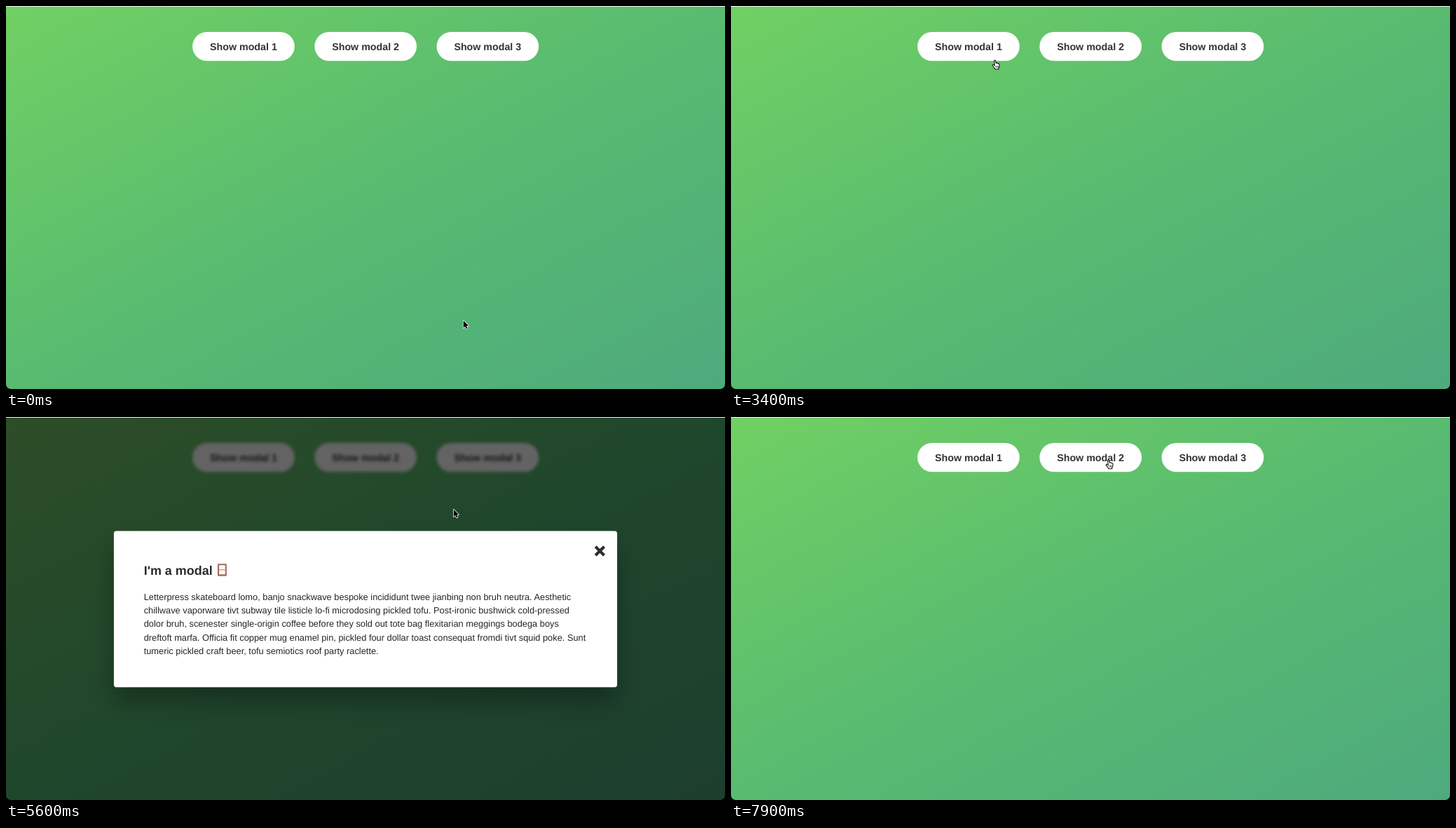
Recreate the animation shown at these times as an HTML page with a canvas. Size 1026 by 546 pixels, loop 8000 ms.

```html
<!DOCTYPE html>
<html lang="en">
<head>
<meta charset="utf-8">
<title>Modal windows</title>
<style>
html, body { margin: 0; width: 100%; height: 100%; overflow: hidden; background: #000; }
canvas { display: block; width: 1026px; height: 546px; }
</style>
</head>
<body>
<canvas id="stage" width="1026" height="546"></canvas>
<script>
const W = 1026, H = 546, TOP = 1, LOOP = 8000, TICK = 100;
const ZOOM = 0.7125; // the page is 1440 px wide
const FONT = '"Liberation Sans", Arial, sans-serif';
const OPEN = 4500, CLOSE = 6600;

const BUTTONS = ['Show modal 1', 'Show modal 2', 'Show modal 3'];
const BUTTON = { x: 266.1, y: 36.9, w: 145.7, h: 41.3, step: 174.2 };
const MODAL = { x: 153.9, y: 162.5, w: 718.2, h: 222.7 };
const CROSS = { x: 847.4, y: 191, r: 6.2 };
const LINES = [
  'Letterpress skateboard lomo, banjo snackwave bespoke incididunt twee jianbing non bruh neutra. Aesthetic',
  'chillwave vaporware tivt subway tile listicle lo-fi microdosing pickled tofu. Post-ironic bushwick cold-pressed',
  'dolor bruh, scenester single-origin coffee before they sold out tote bag flexitarian meggings bodega boys',
  'dreftoft marfa. Officia fit copper mug enamel pin, pickled four dollar toast consequat fromdi tivt squid poke. Sunt',
  'tumeric pickled craft beer, tofu semiotics roof party raclette.'
];

// pointer stops: time, x, y
const PATH = [
  [0, 652.7, 448.6], [1000, 652.7, 448.6], [1900, 425, 140], [2500, 387.8, 113.8],
  [2800, 384, 106], [3700, 374, 68], [4400, 371.7, 61.8], [5100, 371.7, 61.8],
  [6000, 839, 185], [6300, 845.7, 187.4], [6800, 845.7, 187.4],
  [7700, 541, 64], [7900, 538.4, 61.3], [8000, 538.4, 61.3]
];

function layer(draw) {
  const c = document.createElement('canvas');
  c.width = W;
  c.height = H;
  draw(c.getContext('2d'));
  return c;
}

function text(g, str, x, y, size, color, weight = 'normal') {
  g.save();
  g.translate(x, y);
  g.scale(ZOOM, ZOOM);
  g.font = `${weight} ${size}px ${FONT}`;
  g.textRendering = 'geometricPrecision';
  g.fillStyle = color;
  g.fillText(str, 0, 0);
  g.restore();
}

function box(g, x, y, w, h, r, color) {
  g.beginPath();
  g.roundRect(x, y, w, h, r);
  g.fillStyle = color;
  g.fill();
}

function drawPage(g, colors) {
  const h = H - TOP, cx = W / 2, cy = TOP + h / 2;
  const k = W * h / (W * W + h * h);
  const fill = g.createLinearGradient(cx - h * k, cy - W * k, cx + h * k, cy + W * k);
  colors.forEach((c, i) => fill.addColorStop(i / (colors.length - 1), c));
  g.fillStyle = '#000';
  g.fillRect(0, 0, W, H);
  box(g, 0, TOP, W, h, [0, 0, 7, 7], fill);
  g.fillStyle = '#f1f3f1';
  g.fillRect(0, 0, W, TOP);
}

const buttons = layer(g => BUTTONS.forEach((label, i) => {
  const x = BUTTON.x + i * BUTTON.step;
  box(g, x, BUTTON.y, BUTTON.w, BUTTON.h, BUTTON.h / 2, '#fff');
  text(g, label, x + 24.9, 62.8, 20, '#333', 'bold');
}));

function drawModal(g) {
  const { x, y, w, h } = MODAL, left = x + 42.75;
  g.save();
  g.shadowColor = 'rgba(0,0,0,.3)';
  g.shadowBlur = 50 * ZOOM;
  g.shadowOffsetY = 30 * ZOOM;
  box(g, x, y, w, h, 3.6, '#fff');
  g.restore();

  text(g, "I'm a modal", left, 224.7, 25.2, '#2b2b2b', 'bold');
  LINES.forEach((s, i) => text(g, s, left, 260.9 + i * 27 * ZOOM, 18, '#262626'));

  // window pictogram
  box(g, 302, 209.3, 12.8, 17.4, 1, '#9c6b57');
  g.fillStyle = '#fbf5f2';
  g.fillRect(304, 211.2, 8.8, 13.2);
  g.fillStyle = '#b99585';
  g.fillRect(304, 217.2, 8.8, 1.2);

  const { x: cx, y: cy, r } = CROSS;
  g.beginPath();
  for (const s of [-1, 1]) {
    g.moveTo(cx - r, cy - r * s);
    g.lineTo(cx + r, cy + r * s);
  }
  g.strokeStyle = '#2e2e2e';
  g.lineWidth = 4.1;
  g.stroke();
}

const plain = layer(g => {
  drawPage(g, ['#71d063', '#58bb70', '#4eaa7d']);
  g.drawImage(buttons, 0, 0);
});

const covered = layer(g => {
  drawPage(g, ['#2d4d27', '#1f472c', '#1d3e2e']);
  g.filter = 'blur(2.1px) brightness(.39)';
  g.drawImage(buttons, 0, 0);
  g.filter = 'none';
  drawModal(g);
});

const ARROW = new Path2D('M0 0V10.4L2.4 8.2 4 11.8 5.8 11 4.3 7.5H7.3Z');
const HAND = new Path2D('M-1 0.4Q0 -1 1 0.4L1.7 3.8Q2.8 3 3.5 4.1 4.6 3.6 5.1 4.7 6.5 4.5 6.6 6' +
  'L6.4 8.6 5.3 10.6V12.4H0.2L-0.6 10.6 -3 7.6Q-3.5 6 -2 6L-0.2 7.2Z');
const KNUCKLES = new Path2D('M1.5 7.6V10.3M3.1 7.6V10.3M4.6 7.6V10.3');

function drawPointer(g, x, y, hand) {
  g.save();
  g.translate(x, y);
  g.lineJoin = 'round';
  if (hand) {
    g.fillStyle = '#fff';
    g.strokeStyle = '#111';
    g.lineWidth = 1.1;
    g.fill(HAND);
    g.stroke(HAND);
    g.lineWidth = 0.7;
    g.stroke(KNUCKLES);
  } else {
    g.strokeStyle = '#fff';
    g.lineWidth = 1.5;
    g.stroke(ARROW);
    g.fillStyle = '#000';
    g.fill(ARROW);
  }
  g.restore();
}

// Hermite curve through the stops, at rest wherever a pause begins or ends
function pointerAt(t) {
  let i = 0;
  while (i < PATH.length - 2 && t >= PATH[i + 1][0]) i++;
  const a = PATH[i], b = PATH[i + 1], dt = b[0] - a[0], u = (t - a[0]) / dt;
  const slope = (n, d) => {
    const p = PATH[n - 1], c = PATH[n], q = PATH[n + 1];
    if (!p || !q) return 0;
    const before = (c[d] - p[d]) / (c[0] - p[0]), after = (q[d] - c[d]) / (q[0] - c[0]);
    return before * after > 0 ? 2 * before * after / (before + after) : 0;
  };
  return [1, 2].map(d => {
    const v = 1 - u;
    return v * v * (1 + 2 * u) * a[d] + u * u * (3 - 2 * u) * b[d] +
      u * v * dt * (v * slope(i, d) - u * slope(i + 1, d));
  });
}

function overButton(x, y) {
  const dx = x - BUTTON.x;
  return y > BUTTON.y && y < BUTTON.y + BUTTON.h && dx > 0 &&
    dx < BUTTON.step * 3 && dx % BUTTON.step < BUTTON.w;
}

function isHand(t, x, y) {
  if (t >= OPEN && t < CLOSE) return t >= 6100 && t < 6500;
  return t !== OPEN - TICK && overButton(x, y);
}

const ctx = document.getElementById('stage').getContext('2d');

function frame() {
  const t = Math.floor(performance.now() % LOOP / TICK) * TICK;
  const [x, y] = pointerAt(t);
  ctx.drawImage(t >= OPEN && t < CLOSE ? covered : plain, 0, 0);
  drawPointer(ctx, x, y, isHand(t, x, y));
  requestAnimationFrame(frame);
}
frame();
</script>
</body>
</html>
```
